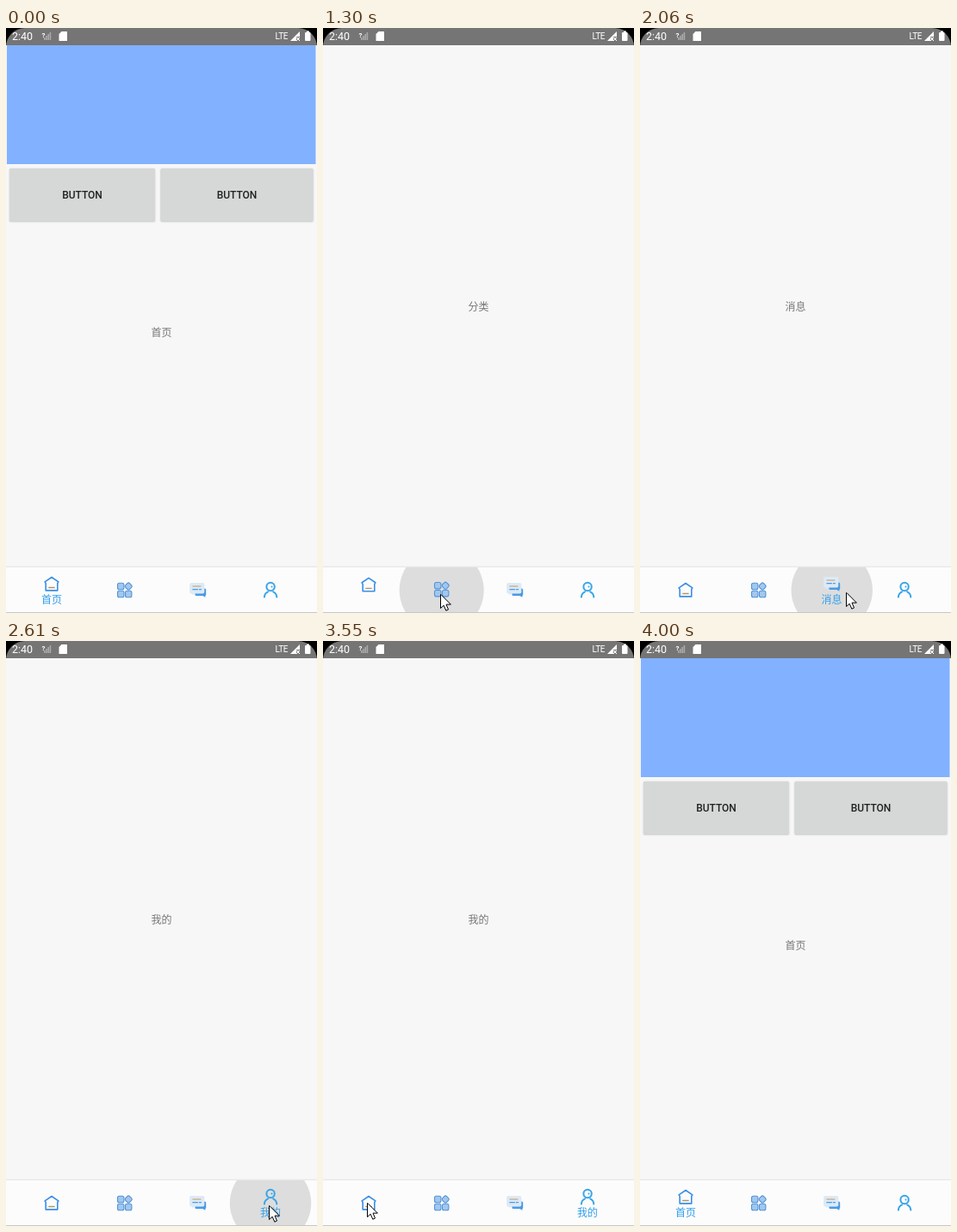
Recreate the animation shown at these times as an HTML page with a canvas. Size 361 by 679 pixels, loop 4.56 s.

```html
<!DOCTYPE html>
<html lang="zh-CN">
<head>
<meta charset="utf-8">
<style>
html, body { margin: 0; width: 100%; height: 100%; overflow: hidden; background: #f7f7f7; }
canvas { display: block; }
</style>
</head>
<body>
<canvas width="361" height="679"></canvas>
<script>
const ctx = document.querySelector('canvas').getContext('2d');
const LOOP = 4560, TICK = 77, FIRST_TICK = 365, EXIT_TICK = 47;
const NAV_Y = 626, ICON_Y = 652.5, RIPPLE_R = 49;
const FONT = 'Roboto, "Noto Sans CJK SC", "Noto Sans CJK", sans-serif';
const names = ['首页', '分类', '消息', '我的'];
const tabX = i => 53 + 84.7 * i;

// The pointer's stops, in ticks: it arrives at "from", presses, drifts to "to" while the tab opens
const stops = [
  { tab: 0, arrive: 0, press: -9, open: -9, fade: -9, leave: 0, from: [236, 674], to: [236, 674] },
  { tab: 1, arrive: 6, press: 8, open: 12, fade: 18, leave: 18, from: [132, 657], to: [136, 657], grown: 1 },
  { tab: 2, arrive: 20, press: 20, open: 21, fade: 25, leave: 22, from: [232, 655], to: [239, 655], grown: .63 },
  { tab: 3, arrive: 26, press: 27, open: 28, fade: 32, leave: 32, from: [305, 655], to: [305, 655], grown: .63 },
  { tab: 0, arrive: 35, press: 35, open: 42, fade: 47, leave: 44, from: [42, 650], to: [53, 652], grown: .63 },
  { arrive: EXIT_TICK, from: [284, 674] }
];

const clamp = v => Math.max(0, Math.min(1, v));
const lerp = (a, b, k) => a + (b - a) * k;
const easeOut = k => 1 - (1 - k) ** 2;

function rect(x, y, w, h, color) {
  ctx.fillStyle = color;
  ctx.fillRect(x, y, w, h);
}

function paint(fill, stroke, width = 1) {
  if (fill) { ctx.fillStyle = fill; ctx.fill(); }
  if (stroke) { ctx.strokeStyle = stroke; ctx.lineWidth = width; ctx.stroke(); }
}

function shape(points, ...style) {
  ctx.beginPath();
  points.forEach(([x, y]) => ctx.lineTo(x, y));
  ctx.closePath();
  paint(...style);
}

function line(x1, y1, x2, y2, color, width) {
  shape([[x1, y1], [x2, y2]], null, color, width);
}

function round(x, y, w, h, r, ...style) {
  ctx.beginPath();
  ctx.roundRect(x, y, w, h, r);
  paint(...style);
}

function arc(x, y, r, a, b, ...style) {
  ctx.beginPath();
  ctx.arc(x, y, r, a * Math.PI, b * Math.PI);
  paint(...style);
}

function text(s, x, y, size, color, align = 'center', weight = 400) {
  ctx.font = `${weight} ${size}px ${FONT}`;
  ctx.textAlign = align;
  ctx.fillStyle = color;
  ctx.fillText(s, x, y);
}

function statusBar() {
  rect(0, 0, 361, 20, '#000');
  round(0, 0, 361, 50, 22, '#757575');
  rect(0, 20, 361, 30, '#f7f7f7');
  text('2:40', 7, 14, 12.5, '#fff', 'left');
  text('?', 41.5, 11, 8, '#fff', 'left', 700);
  for (let i = 0; i < 4; i++) rect(44 + i * 2.2, 11 - i * 2, 1.6, 3 + i * 2, '#aaa');
  shape([[64.5, 4], [71, 4], [71, 15], [61.5, 15], [61.5, 7]], '#fff');
  ctx.letterSpacing = '-0.4px';
  text('LTE', 312.5, 13, 10, '#fff', 'left');
  ctx.letterSpacing = '0px';
  shape([[341, 4], [341, 15], [330, 15]], '#fff');
  rect(337, 10, 4, 5, '#757575');
  line(337.5, 11, 340.5, 14.5, '#fff');
  line(340.5, 11, 337.5, 14.5, '#fff');
  round(347, 5, 6.5, 10, 1, '#fff');
  rect(349, 3.5, 3, 2, '#fff');
}

function button(x, w) {
  ctx.save();
  ctx.shadowColor = 'rgba(0,0,0,.22)';
  ctx.shadowBlur = 2;
  ctx.shadowOffsetY = .5;
  round(x, 163, w, 61.5, 1.5, '#d6d7d7');
  ctx.restore();
  text('BUTTON', x + w / 2, 198, 12, '#222', 'center', 500);
}

function page(tab) {
  if (tab === 0) {
    rect(1, 20, 358.5, 138, '#82b1ff');
    button(4, 169);
    button(179.5, 177);
  }
  text(names[tab], 180.5, tab ? 327.5 : 358, 12, '#777');
}

function homeIcon() {
  const wall = 6.8;
  shape([[0, -8], [7.9, -2.6], [wall, -1], [wall, 7.4], [-wall, 7.4], [-wall, -1], [-7.9, -2.6]],
    null, '#3a8ee6', 1.6);
  line(-3.2, 4, 3.2, 4, '#b09468', 1.3);
}

function gridIcon() {
  const style = ['#a3c7ec', '#5194da', 1.1];
  for (const [x, y] of [[-8.2, -8.2], [-8.2, .8], [.8, .8]]) round(x, y, 7.4, 7.4, 2, ...style);
  ctx.translate(4.5, -4.5);
  ctx.rotate(Math.PI / 4);
  round(-3.4, -3.4, 6.8, 6.8, 2, ...style);
}

function chatIcon() {
  const blue = '#4a9ae4', pale = '#dceaf7';
  round(-3, -2, 12.8, 8.6, 1.5, blue);
  shape([[5, 6], [9, 6], [9, 8.2]], blue);
  round(-9.3, -8.5, 17.2, 12.6, 2, pale);
  shape([[-7, 3], [-2, 3], [-6, 5.5]], pale);
  line(-5.5, -4.5, 3.5, -4.5, '#cbb58c', 1.3);
  line(-5.5, -.8, 0, -.8, blue, 1.3);
  line(2, -.8, 4, -.8, blue, 1.3);
}

function personIcon() {
  const blue = '#38a5e8';
  arc(0, -4, 4.7, 0, 2, null, blue, 2);
  arc(1.4, -4, 1, 0, 2, blue);
  arc(0, 8.4, 7.2, 1.02, 1.36, null, blue, 2);
  arc(0, 8.4, 7.2, 1.64, 1.98, null, blue, 2);
}

const icons = [homeIcon, gridIcon, chatIcon, personIcon];

// Grows from the touched point to the middle of the tab, then fades
function ripple(stop, tick) {
  const p = clamp(stop.grown + (tick - stop.open) / 3);
  const alpha = .125 * clamp(p * 1.2) * clamp((stop.fade - tick) / 2);
  if (!alpha) return;
  ctx.save();
  ctx.beginPath();
  ctx.rect(0, NAV_Y, 361, 52);
  ctx.clip();
  arc(lerp(stop.from[0], tabX(stop.tab), p), ICON_Y, RIPPLE_R * p, 0, 2, `rgba(0,0,0,${alpha})`);
  ctx.restore();
}

function navBar(stop, previous, tick) {
  rect(0, NAV_Y - 2, 361, 1, '#f2f2f2');
  rect(0, NAV_Y - 1, 361, 1, '#e8e8e8');
  rect(0, NAV_Y, 361, 53, '#fcfcfc');
  rect(0, 678, 361, 1, '#c6c6c6');
  if (previous) ripple(stop, tick);

  const k = clamp(tick - stop.open + .12);
  icons.forEach((icon, i) => {
    const lift = i === stop.tab ? k : i === previous?.tab ? 1 - k : 0;
    ctx.save();
    ctx.translate(tabX(i), ICON_Y - 7 * lift);
    icon();
    ctx.restore();
  });
  ctx.globalAlpha = clamp(k * 2 - 1);
  text(names[stop.tab], tabX(stop.tab), 668, 12, '#319fec');
  ctx.globalAlpha = 1;
}

function pointer(tick) {
  if (tick < 0 || tick >= EXIT_TICK) return;
  const i = stops.findLastIndex(s => tick >= s.arrive), stop = stops[i], next = stops[i + 1];
  const [a, b, k] = tick <= stop.leave
    ? [stop.from, stop.to, clamp((tick - stop.arrive) / (stop.open - stop.arrive))]
    : [stop.to, next.from, easeOut((tick - stop.leave) / (next.arrive - stop.leave))];
  ctx.save();
  ctx.translate(Math.round(lerp(a[0], b[0], k)) + .5, Math.round(lerp(a[1], b[1], k)) + .5);
  if (tick === stop.press) arc(-.5, -.5, 12, 0, 2, 'rgba(255,255,0,.47)');
  shape([[0, 0], [0, 16], [3.7, 12.7], [6.3, 18.7], [9, 17.5], [6.5, 11.6], [11.5, 11.6]], '#fff', '#000');
  ctx.restore();
}

function draw(time) {
  const tick = Math.floor((time % LOOP - FIRST_TICK) / TICK);
  const open = Math.max(0, stops.findLastIndex(s => tick >= s.open));
  rect(0, 0, 361, 679, '#f7f7f7');
  statusBar();
  page(stops[open].tab);
  navBar(stops[open], stops[open - 1], tick);
  pointer(tick);
}

ctx.lineCap = ctx.lineJoin = 'round';
const start = performance.now();
function loop() {
  draw(performance.now() - start);
  requestAnimationFrame(loop);
}
loop();
</script>
</body>
</html>
```
